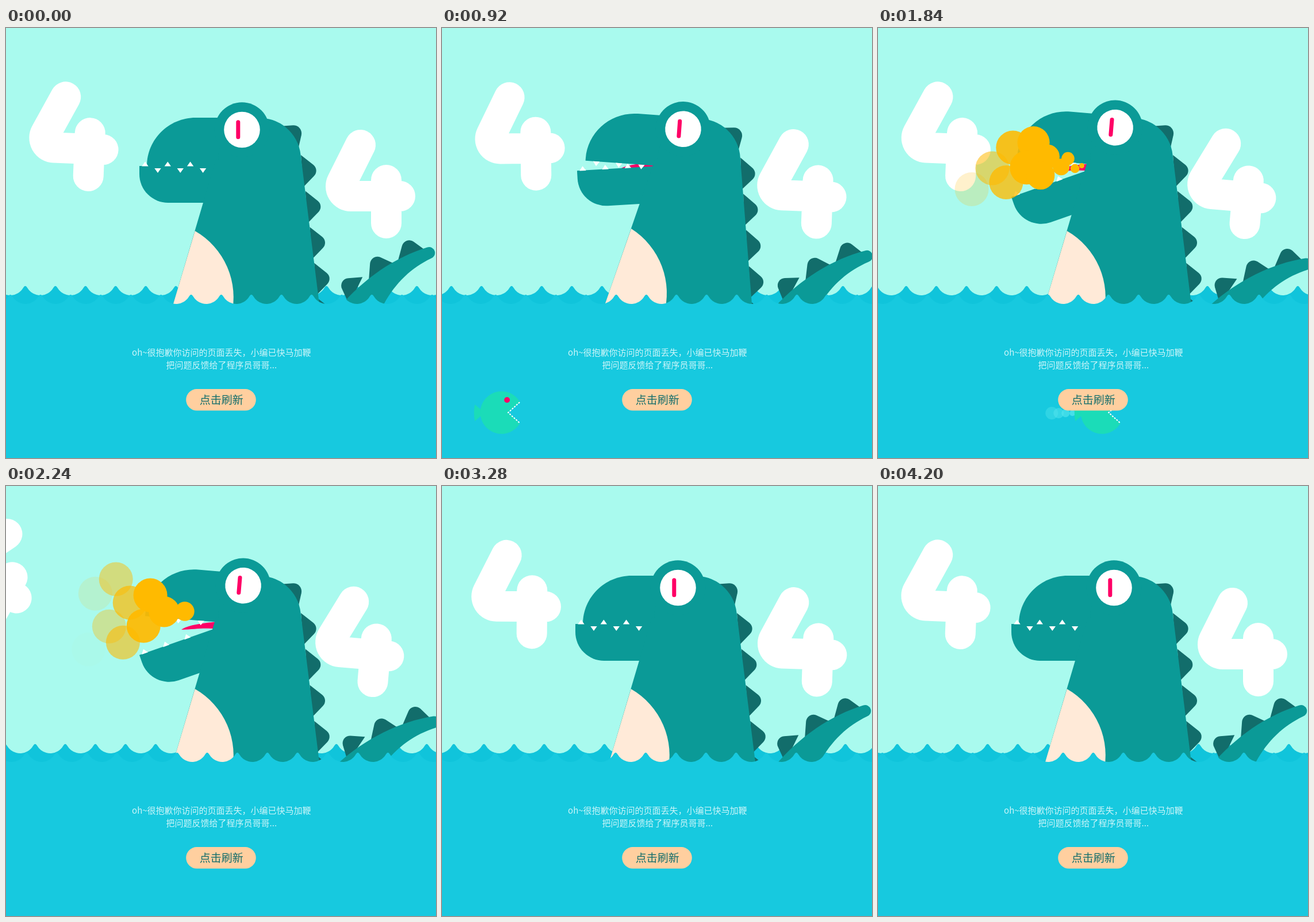
An HTML page with a canvas that plays this animation: 748x748 px, repeating every 4.24 s.

```html
<!DOCTYPE html>
<html lang="zh-CN">
<head>
<meta charset="utf-8">
<title>404</title>
<style>
html, body { margin: 0; width: 100%; height: 100%; overflow: hidden; background: #a9faee; }
canvas { display: block; }
</style>
</head>
<body>
<canvas id="stage" width="748" height="748"></canvas>
<script>
const ctx = document.getElementById('stage').getContext('2d');
const LOOP = 4240, STEP = 40, END = 4200;
const SKY = '#a9faee', WATER = '#17c9df', DEEP = '#10c4db', SKIN = '#0b9a97', DARK = '#126d6b',
  CREAM = '#ffead8', PINK = '#ff0066', FIRE = '#ffba00', FISH = '#1bdcb8', PEACH = '#ffcf9f', PALE = '#cdf5f9';
const FONT = '"Noto Sans CJK SC", "Noto Sans CJK", sans-serif';

const clamp = v => Math.max(0, Math.min(1, v));
const ramp = (t, a, b) => (1 - Math.cos(Math.PI * clamp((t - a) / (b - a)))) / 2;
const swing = (t, peak) => ramp(t, 0, peak) - ramp(t, peak, END);

function group(draw) {
  ctx.save();
  draw();
  ctx.restore();
}

function place(x, y, deg) {
  ctx.translate(x, y);
  ctx.rotate(deg * Math.PI / 180);
}

function spin(deg, x, y) {
  place(x, y, deg);
  ctx.translate(-x, -y);
}

function fill(path, color) {
  ctx.fillStyle = color;
  ctx.fill(new Path2D(path));
}

function disc(x, y, r, color) {
  ctx.fillStyle = color;
  ctx.beginPath();
  ctx.arc(x, y, r, 0, 7);
  ctx.fill();
}

// Triangle whose middle corner is rounded
function spike(x1, y1, x2, y2, x3, y3, r) {
  ctx.fillStyle = DARK;
  ctx.beginPath();
  ctx.moveTo(x1, y1);
  ctx.arcTo(x2, y2, x3, y3, r);
  ctx.lineTo(x3, y3);
  ctx.fill();
}

function wave(offset, top, color) {
  const period = 52.4, r = 26.2, a = 0.52;
  ctx.fillStyle = color;
  ctx.beginPath();
  ctx.moveTo(-200, 748);
  for (let peak = offset - 3 * period; peak < 860; peak += period) {
    const mid = peak + period / 2;
    ctx.quadraticCurveTo(peak, top - 3.5, mid - r * Math.cos(a), top + 2.8);
    ctx.arc(mid, top - 10.2, r, Math.PI - a, a, true);
  }
  ctx.lineTo(900, 748);
  ctx.fill();
}

// Digit centred on the given point
function four(x, y, deg) {
  group(() => {
    place(x, y, deg);
    ctx.strokeStyle = '#fff';
    ctx.lineWidth = 53;
    ctx.lineCap = 'round';
    ctx.beginPath();
    ctx.moveTo(-17.5, -67.5);
    ctx.arcTo(-62, 21.5, 51.5, 21.5, 17);
    ctx.lineTo(51.5, 21.5);
    ctx.moveTo(27.5, -6.5);
    ctx.lineTo(27.5, 68.5);
    ctx.stroke();
  });
}

function fours(t) {
  const drift = t < 2500 ? ramp(t, 0, 960) - ramp(t, 960, 1920) : 0.65 * (1 - ramp(t, 3160, END));
  const away = ramp(t, 1900, 2560) - ramp(t, 2720, 3160);
  four(118.5 + 17 * drift - 257 * away, 188 - 71 * away, 2.3 - 3 * drift + 52 * away);
  const s = swing(t, 2040);
  four(634 - 18 * s, 271 - s, 5 * s);
}

function tail(open) {
  group(() => {
    spin(8 * open, 602, 465);
    for (const [x, y, deg] of [[597, 481, -64], [631, 440, -35], [681, 408, -24]]) {
      group(() => {
        place(x, y, deg);
        spike(0, 0, 31, -38, 53, 0, 13);
      });
    }
    fill('M580 486 C622 436 676 399 733 381.5 A10 10 0 0 1 739 401 C706 417 678 442 657 481 L652 492 Z', SKIN);
  });
}

function teeth(x, y, height) {
  for (let i = 0; i < 3; i++) fill(`M${x + 39.3 * i - 5.7} ${y} h11.4 l-5.7 ${height} Z`, '#fff');
}

function dino(t, open) {
  const head = () => spin(4.8 * open, 456, 200);
  const jaw = () => spin(-19.3 * open, 391, 267);
  group(() => {
    spin(2.6 * (ramp(t, 0, 920) - ramp(t, 920, 1480)), 416, 360);
    spike(474, 171, 518, 168, 508, 212, 14);
    for (let i = 0; i < 5; i++) {
      const x = 7.7 * i, y = 62.6 * i;
      spike(513 + x, 221 + y, 546 + x, 247 + y, 517 + x, 277 + y, 13);
    }
    fill('M305 250 C315 243 335 239 368 236 V249 C345 246 330 249 305 250 Z', PINK);
    group(() => {
      head();
      fill('M245 244 V240 C245 194 283 156 330 156 H440 V244 Z', SKIN);
    });
    group(() => {
      jaw();
      fill('M232 240 H400 V304 H282 A50 50 0 0 1 232 254 Z', SKIN);
    });
    fill('M285 500 L366 226 L369 230 A72 72 0 0 1 512.6 221 L547.5 500 Z', SKIN);
    fill('M328.7 353 A133 133 0 0 1 392 500 H285 Z', CREAM);
    group(() => {
      jaw();
      teeth(242, 240.5, -8);
    });
    group(() => {
      head();
      teeth(264, 244, 8);
      disc(410.5, 177, 47.7, SKIN);
      disc(410.5, 177, 31.3, '#fff');
      ctx.strokeStyle = PINK;
      ctx.lineWidth = 7;
      ctx.lineCap = 'round';
      ctx.beginPath();
      ctx.moveTo(403.8, 163.8);
      ctx.lineTo(403.8, 189.8);
      ctx.stroke();
    });
  });
}

// Four staggered lanes fan out of the mouth, each with four puffs
function flames(t) {
  for (let i = 0; i < 16; i++) {
    const lane = i % 4, n = (i - lane) / 4;
    const d = (t - 1274 - 103 * lane - 172 * n) * 0.348;
    const x = 360 - d, slope = 0.2 * Math.cos(lane) - 0.09 * lane;
    if (d <= 0 || x < 142) continue;
    ctx.globalAlpha = clamp((x - 142) / 105);
    disc(x, 241 + slope * d, Math.min(29.5, 3 + 0.28 * d), FIRE);
  }
  ctx.globalAlpha = 1;
}

function fish(t) {
  const boost = Math.max(0, t - 1840);
  const x = -182 + 0.311 * t + 0.0022 * boost * boost;
  if (x > 860) return;
  group(() => {
    ctx.translate(x, 669);
    const puff = clamp((t - 1700) / 140);
    for (let i = 0; i < 4; i++) {
      ctx.globalAlpha = 0.75 - 0.12 * i;
      disc(-52 - 12 * i, 1, (5 + 2 * i) * puff, '#55e6ee');
    }
    ctx.globalAlpha = 1;
    fill('M-30 0 L-47 -14 Q-50 0 -47 15 Z', FISH);
    fill('M31.5 -18.5 A37 37 0 1 0 31.5 18.5 L10 0 Z', FISH);
    disc(9, -22, 5, PINK);
    ctx.strokeStyle = '#fff';
    ctx.lineWidth = 2;
    ctx.setLineDash([3, 2]);
    ctx.stroke(new Path2D('M31 -18 L11 0 L31 18'));
  });
}

function label(text, y, size, weight, color) {
  ctx.font = `${weight} ${size}px ${FONT}`;
  ctx.textAlign = 'center';
  ctx.fillStyle = color;
  ctx.fillText(text, 374.8, y);
}

function draw(t) {
  const open = ramp(t, 680, 1320) - ramp(t, 2440, 3060);
  ctx.fillStyle = SKY;
  ctx.fillRect(0, 0, 748, 748);
  wave(33.5 - 37 * swing(t, 1920), 449, DEEP);
  fours(t);
  tail(open);
  dino(t, open);
  flames(t);
  wave(7.6 + 81.5 * swing(t, 2080), 464, WATER);
  fish(t);
  label('oh~很抱歉你访问的页面丢失，小编已快马加鞭', 570, 15, 300, PALE);
  label('把问题反馈给了程序员哥哥...', 592, 15, 300, PALE);
  fill('M332 628 H416 A18.8 18.8 0 0 1 416 665.6 H332 A18.8 18.8 0 0 1 332 628 Z', PEACH);
  label('点击刷新', 654, 19, 400, DARK);
}

const begin = performance.now();
function tick() {
  const t = (performance.now() - begin) % LOOP;
  draw(Math.floor(t / STEP) * STEP);
  requestAnimationFrame(tick);
}
tick();
</script>
</body>
</html>
```
